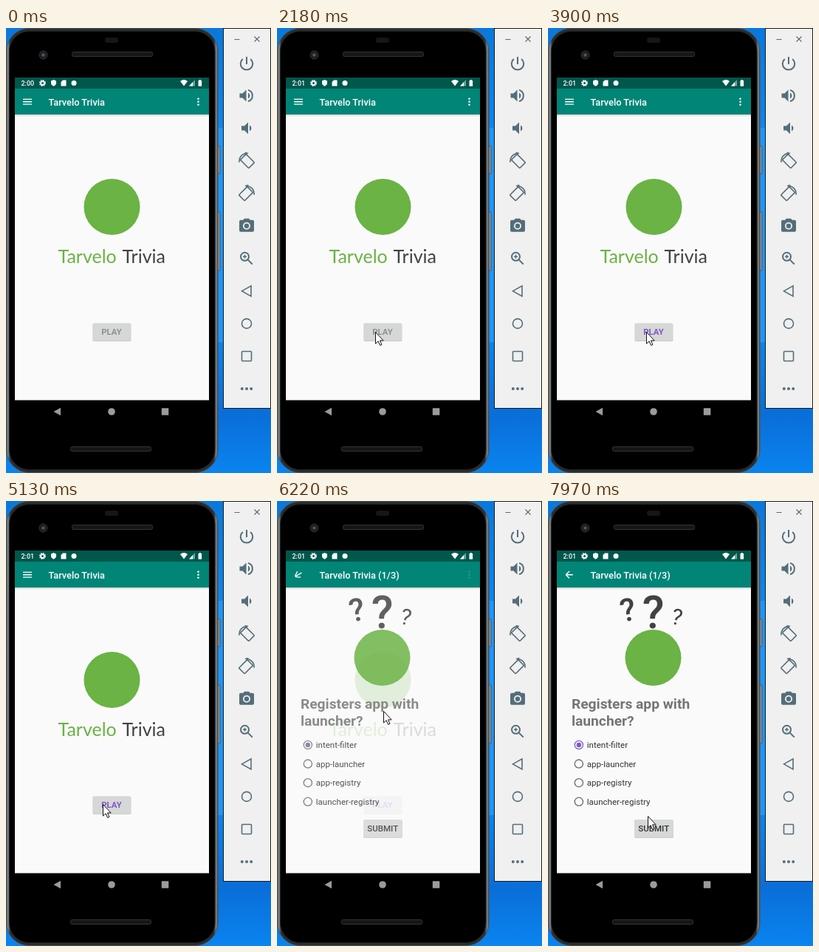
An HTML page for the animation above (8 s loop, 359 px wide and 602 px high).

```html
<!DOCTYPE html>
<html lang="en">
<head>
<meta charset="utf-8">
<title>Trivia app in a phone emulator</title>
<style>
html, body { margin: 0; width: 100%; height: 100%; overflow: hidden; background: #0a7ce6; }
svg { display: block; }
text { font-family: Roboto, Arial, sans-serif; }
.word { font-family: Lato, sans-serif; font-size: 25px; }
.bold { font-weight: 700; }
.mid { font-weight: 500; }
.line { fill: none; stroke: #546e7a; stroke-width: 2; }
.thin { stroke-width: 1.6; }
</style>
</head>
<body>
<svg id="stage" width="359" height="602" viewBox="0 0 359 602">
  <defs>
    <linearGradient id="sky" x1="0" y1="0" x2="0" y2="1">
      <stop offset="0" stop-color="#0a78dc"/>
      <stop offset=".3" stop-color="#0a8cf6"/>
      <stop offset=".7" stop-color="#0a86ee"/>
      <stop offset=".87" stop-color="#0a6ed8"/>
      <stop offset="1" stop-color="#0a84f0"/>
    </linearGradient>
    <linearGradient id="rim" x1="0" x2="1" y1="0" y2="0">
      <stop offset="0" stop-color="#3a3f42"/>
      <stop offset=".007" stop-color="#85898b"/>
      <stop offset=".018" stop-color="#2a2d2e"/>
      <stop offset=".982" stop-color="#2a2d2e"/>
      <stop offset=".993" stop-color="#85898b"/>
      <stop offset="1" stop-color="#3a3f42"/>
    </linearGradient>
    <linearGradient id="shade" x1="0" x2="0" y1="0" y2="1">
      <stop offset="0" stop-color="#000" stop-opacity=".16"/>
      <stop offset="1" stop-color="#000" stop-opacity="0"/>
    </linearGradient>
  </defs>

  <rect width="359" height="602" fill="url(#sky)"/>
  <path d="M287 135h8v290h-8z" fill="#1e96fa"/>

  <!-- phone body -->
  <g fill="#8a9094" stroke="#33383a" stroke-width=".6">
    <rect x="284" y="160" width="6" height="37" rx="1"/>
    <rect x="284" y="249" width="6" height="79" rx="1"/>
  </g>
  <rect x=".5" y=".5" width="286.500" height="601" rx="31" fill="url(#rim)" stroke="#4a5052"/>
  <rect x="4.500" y="4.500" width="278.500" height="593" rx="27" fill="#000" stroke="#1d1f20"/>
  <g fill="#161616" stroke="#333" stroke-width="1">
    <rect x="89.500" y="32.500" width="109" height="6" rx="2"/>
    <rect x="87.500" y="566.500" width="109" height="6" rx="2"/>
    <circle cx="50.500" cy="36.500" r="5.500" fill="#1b1e20"/>
  </g>
  <circle cx="50.500" cy="36.500" r="2.300" fill="#4a555c"/>
  <rect x="134" y="13" width="18" height="7" rx="3" fill="#161616"/>

  <!-- screen -->
  <rect x="12" y="67" width="263" height="436.500" fill="#fafafa"/>
  <rect x="12" y="67" width="263" height="15" fill="#00574b"/>
  <rect x="12" y="82" width="263" height="35" fill="#008577"/>
  <rect x="12" y="117" width="263" height="3" fill="url(#shade)"/>

  <g fill="#fff">
    <text id="clock" class="mid" x="20.500" y="78" font-size="9"></text>
    <circle cx="49.500" cy="74.500" r="2.500" fill="none" stroke="#fff" stroke-width="2"/>
    <circle cx="49.500" cy="74.500" r="4" fill="none" stroke="#fff" stroke-width="1.200" stroke-dasharray="1.600 1.540"/>
    <path d="M64.500 70l3.500 1.500v3c0 2-1.500 3.500-3.500 4.200c-2-.7-3.500-2.200-3.500-4.200v-3z"/>
    <path d="M77 70.500h4.500v8h-7v-5.500z"/>
    <circle cx="92" cy="74.500" r="3.500"/>
    <path d="M236 72q5-4 10 0l-5 6.500z"/>
    <path d="M256 70v8.500h-8z" opacity=".45"/>
    <path d="M253 73.300v5.200h-5z"/>
    <path d="M260.500 71h1.300v-1h2v1h1.300v7.700h-4.600z"/>
  </g>

  <path id="menu" fill="none" stroke="#fff" stroke-width="1.350"/>
  <text id="title" class="mid" x="57.500" y="105" font-size="12.800" fill="#fff"></text>

  <g id="home">
    <g fill="#fff">
      <circle cx="260.500" cy="95.700" r="1.300"/><circle cx="260.500" cy="99.700" r="1.300"/><circle cx="260.500" cy="103.700" r="1.300"/>
    </g>
    <circle cx="143.500" cy="242" r="38" fill="#6ab344"/>
    <text class="word" x="70.500" y="318" fill="#6ab344">Tarvelo</text>
    <text class="word" x="216" y="318" fill="#424242" text-anchor="end">Trivia</text>
    <rect x="117.500" y="400" width="52" height="24" rx="1.500" fill="#000" opacity=".17"/>
    <rect id="key" x="117.500" y="399.300" width="51.500" height="23.500" rx="1.500"/>
    <text id="play" class="bold" x="143" y="415.300" font-size="11.400" text-anchor="middle">PLAY</text>
  </g>

  <g id="quiz">
    <circle cx="142.500" cy="212" r="38" fill="#6ab344"/>
    <g fill="#424242" text-anchor="middle">
      <text transform="translate(111 162) rotate(-11)" font-size="43" class="mid">?</text>
      <text x="142.500" y="171.500" font-size="61" class="mid">?</text>
      <text transform="translate(172.500 167) rotate(13)" font-size="30">?</text>
    </g>
    <g class="bold" font-size="19.200" fill="#757575">
      <text x="32" y="281">Registers app with</text>
      <text x="32" y="303.500">launcher?</text>
    </g>
    <g id="options"></g>
    <rect x="117" y="432" width="53" height="24" rx="1.500" fill="#000" opacity=".17"/>
    <rect x="117" y="431" width="52.500" height="23.500" rx="1.500" fill="#d6d7d7"/>
    <text class="mid" x="143.200" y="446.800" font-size="11.500" fill="#333" text-anchor="middle">SUBMIT</text>
  </g>

  <!-- navigation keys -->
  <g fill="#9b9b9b">
    <path d="M64.500 519l9.500-5.300v10.600z"/>
    <circle cx="143" cy="519" r="4.800"/>
    <rect x="210.800" y="514.300" width="9.500" height="9.500" rx=".5"/>
  </g>

  <!-- emulator tools -->
  <rect x="294.500" y=".5" width="64" height="514" fill="#f0f0f0" stroke="#16191c"/>
  <path d="M309.500 15.500h7M336.500 11.500l7 7m0-7l-7 7" fill="none" stroke="#666" stroke-width="1.100"/>
  <g id="tools" fill="#546e7a"></g>

  <path id="cursor" d="M.5.5v15.600l3.600-3.400l2.500 5.700l2.300-1l-2.400-5.500h4.700z" fill="#fff" stroke="#111" stroke-width="1" stroke-linejoin="round"/>
</svg>

<script>
const LOOP = 8000;
const NAME = 'Tarvelo Trivia';
const PURPLE = '#7e57c8';
const $ = id => document.getElementById(id);
const lerp = (a, b, p) => a + (b - a) * p;

const speaker = x => `<path d="M${x} 9v6h4l5 5V4l-5 5z"/>`;
const turn = `<rect class="line thin" x="-8" y="-5.500" width="16" height="11" rx="1" transform="translate(13 12.500) rotate(45)"/>
  <path class="line thin" d="M2 14A10.500 10.500 0 0 1 11 2"/>
  <path d="M9.500 0l5 1.300l-3.600 3.600z"/>`;
const tools = [
  '<path class="line" d="M12 3.500v10M6.800 6.500a8.200 8.200 0 1 0 10.400 0"/>',
  speaker(2.5) + '<path d="M14 8a4.500 4.500 0 0 1 0 8z"/><path class="line" d="M14 4.300a8 8 0 0 1 0 15.400"/>',
  speaker(5) + '<path d="M16 8a4.500 4.500 0 0 1 0 8z"/>',
  turn,
  `<g transform="matrix(-1 0 0 1 24 0)">${turn}</g>`,
  `<path fill-rule="evenodd" d="M9 2L7.200 4H4a2 2 0 0 0-2 2v12a2 2 0 0 0 2 2h16a2 2 0 0 0 2-2V6a2 2 0 0 0-2-2h-3.200L15 2zM12 7a5 5 0 1 1 0 10a5 5 0 0 1 0-10z"/>
   <circle cx="12" cy="12" r="3.200"/>`,
  '<circle class="line" cx="9.500" cy="9.500" r="5.500"/><path class="line" d="M13.800 13.800l6 6"/><path class="line thin" d="M9.500 7v5M7 9.500h5"/>',
  '<path class="line thin" d="M5.500 12l12.500-7v14z"/>',
  '<circle class="line thin" cx="12" cy="12" r="6.500"/>',
  '<rect class="line thin" x="5.500" y="5.500" width="13" height="13" rx="1"/>',
  '<circle cx="5.800" cy="12" r="2"/><circle cx="12" cy="12" r="2"/><circle cx="18.200" cy="12" r="2"/>'
];
$('tools').innerHTML = tools.map((icon, i) =>
  `<g transform="translate(314 ${35.5 + i * 44.05})">${icon}</g>`).join('');

const answers = ['intent-filter', 'app-launcher', 'app-registry', 'launcher-registry'];
$('options').innerHTML = answers.map((label, i) => {
  const y = 330 + i * 25.6;
  return `<circle cx="41.800" cy="${y}" r="5.600" fill="none" stroke="#666" stroke-width="1.300"/>
    <text x="52.800" y="${y + 4}" font-size="11.500" fill="#333">${label}</text>`;
}).join('') + '<circle id="dot" cx="41.800" cy="330" r="3.200"/>';
const ring = $('options').querySelector('circle');

// Pointer moves: start, end, steps, then evenly timed points
const moves = [
  [410, 1020, 9, [243, 575], [205, 492], [179, 446], [163, 425]],
  [1250, 1950, 10, [160, 430], [158, 434], [150, 424], [132, 407], [121, 399]],
  [2180, 2330, 3, [133, 411], [133, 411]],
  [4510, 4590, 2, [132, 414], [131, 417]],
  [5050, 5750, 10, [131, 416], [131, 398], [132, 360], [133, 321]],
  [5820, 5820, 1, [144, 303]],
  [5900, 6280, 6, [144, 298], [144, 281]],
  [6440, 6820, 6, [143, 282], [128, 288], [101, 301]],
  [6900, 7220, 5, [84, 310], [50, 327], [34, 335]],
  [7590, 7670, 2, [80, 370], [123, 400]],
  [7820, 7970, 3, [128, 408], [132, 418], [135, 426]]
];

// Number of steps taken at time t, from 0 to n
function steps(t, a, b, n) {
  if (t < a) return 0;
  if (t >= b) return n;
  return Math.min(n, 1 + Math.floor((t - a) / (b - a) * (n - 1) + 0.05));
}

function pointer(t) {
  const move = moves.filter(m => t >= m[0]).pop();
  if (!move) return null;
  const [a, b, n, ...pts] = move;
  const pos = n > 1 ? (steps(t, a, b, n) - 1) / (n - 1) * (pts.length - 1) : 0;
  const i = Math.floor(pos);
  const p = pts[i], q = pts[Math.min(i + 1, pts.length - 1)];
  return [0, 1].map(k => Math.round(lerp(p[k], q[k], pos - i)));
}

// Three bars turn into a back arrow
function drawMenu(p) {
  const bar = s => `M${lerp(-6, 0, p)} ${s * lerp(3.4, 4.8, p)}L${lerp(6, 4.8, p)} ${lerp(s * 3.4, 0, p)}`;
  $('menu').setAttribute('d', bar(-1) + bar(1) + `M${lerp(-6, -4.8, p)} 0H${lerp(6, 4.8, p)}`);
  $('menu').setAttribute('transform', `translate(29 99.7) rotate(${180 * p})`);
}

function draw(t) {
  const fade = steps(t, 5900, 6280, 6) / 6;
  $('clock').textContent = t < 1600 ? '2:00' : '2:01';
  $('title').textContent = NAME + (fade ? ' (1/3)' : '');
  $('home').setAttribute('opacity', 1 - fade);
  $('quiz').setAttribute('opacity', fade);
  drawMenu(fade);

  $('play').setAttribute('fill', t < 2650 ? '#8f9093' : PURPLE);
  $('key').setAttribute('fill', t >= 2650 && t < 3900 ? '#d0d1d2' : '#d6d7d7');
  const picked = t >= 7130;
  $('dot').setAttribute('fill', picked ? PURPLE : '#77718a');
  ring.setAttribute('stroke', picked ? PURPLE : '#77718a');

  const at = pointer(t);
  $('cursor').style.display = at ? '' : 'none';
  if (at) $('cursor').setAttribute('transform', `translate(${at[0]} ${at[1]})`);
}

const start = performance.now();
function tick() {
  draw((performance.now() - start) % LOOP);
  requestAnimationFrame(tick);
}
draw(0);
requestAnimationFrame(tick);
</script>
</body>
</html>
```
